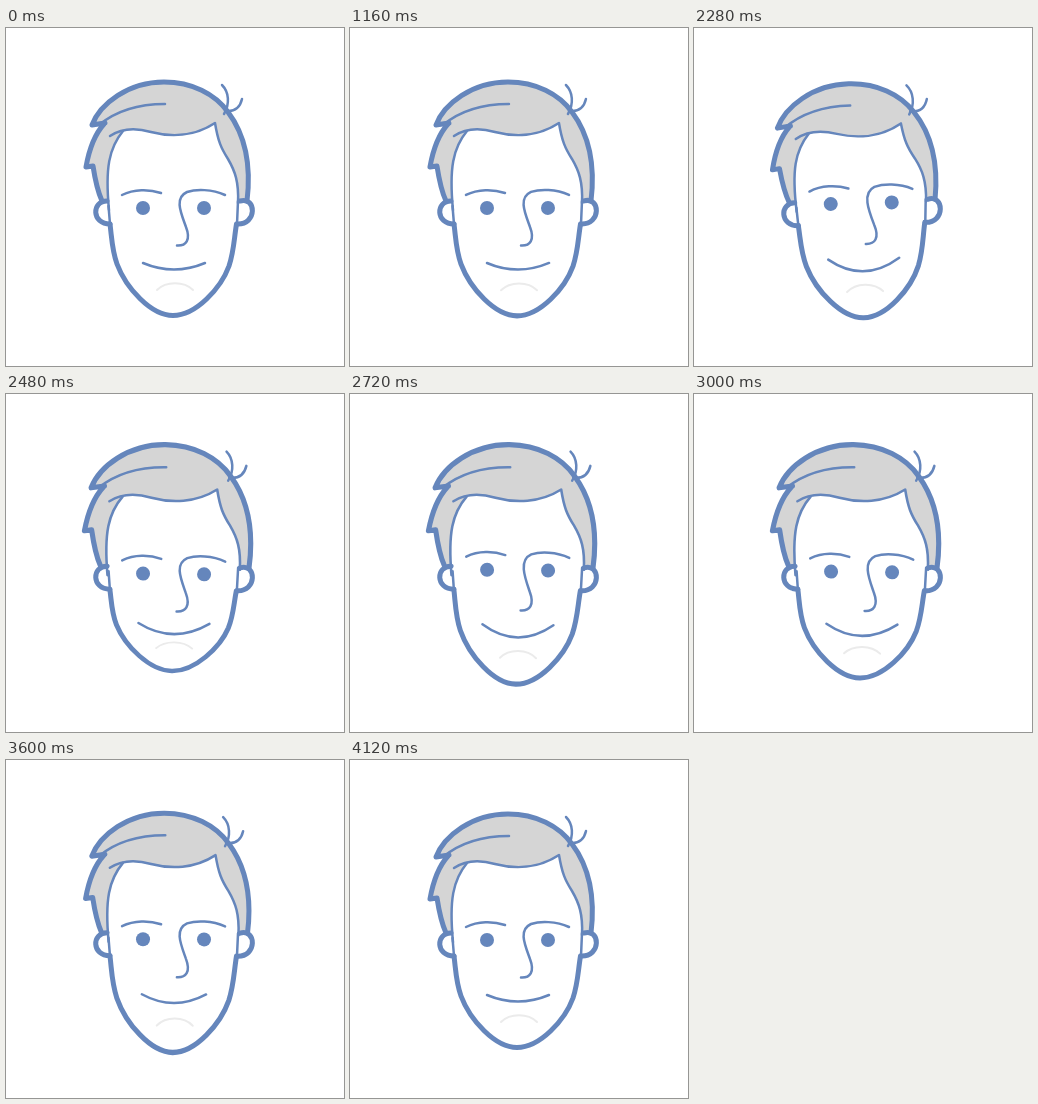
Recreate the animation shown at these times as an HTML page. Size 338 by 338 pixels, loop 5320 ms.

```html
<!DOCTYPE html>
<html lang="en">
<head>
<meta charset="utf-8">
<title>Laughing face</title>
<style>
  html, body { margin: 0; width: 100%; height: 100%; overflow: hidden; background: #fff; }
  svg { display: block; width: 100%; height: 100%; }
  path { fill: none; stroke: #6586bc; stroke-width: 2.5; stroke-linecap: round; stroke-linejoin: round; }
  .thick { stroke-width: 5; }
  .hair { fill: #d5d5d5; stroke: none; }
  .skin { fill: #fff; stroke: none; }
  .crease { stroke: #ebebeb; stroke-width: 2; }
  circle { fill: #6586bc; }
</style>
</head>
<body>
<svg viewBox="0 0 338 338">
  <g id="head">
    <g id="hair">
      <path class="hair" d="M86 97C94 76 122 54 158 54C186 54 209 66 222 84C237 104 246 132 241 174L96 173C91 162 89 151 87 138L80 139C83 122 88 107 98 96Z"/>
      <path class="thick" d="M99 95L86 97C94 76 122 54 158 54C186 54 209 66 222 84C237 104 246 132 241 173"/>
      <path class="thick" d="M98 96C88 107 83 122 80 139L87 138C89 151 91 162 96 173"/>
      <path d="M93 97C111 82 133 76 159 76"/>
    </g>
    <g id="hairline">
      <path class="skin" d="M117 103C126 101 134 101 145 104C164 109 188 109 209 95C212 113 215 120 222 131C229 143 233 154 232 178L103 178C99 140 103 120 117 103Z"/>
      <path d="M104 108C116 100 131 100 145 104C164 109 188 109 209 95C212 113 215 120 222 131C229 143 233 154 232 175"/>
      <path d="M117 103C103 120 99 140 103 182"/>
    </g>
    <g id="tuft">
      <path d="M216 57C223 64 224 76 218 86"/>
      <path d="M236 71C234 80 228 84 219 83"/>
    </g>
    <path class="thick" d="M101 173C85.500 173 85.500 196 104 196"/>
    <path class="thick" d="M234 173C250.500 168 251.500 197 231 196"/>
    <path d="M232 173L231 196M102.500 178L104 196"/>
    <g id="jaw">
      <path class="thick" d="M104 196C106 212 106 222 111 236C120 260 145 287.500 167 287.500C190 287.500 215 260 223 238C228 223 228 211 230.500 196"/>
      <path class="crease" d="M151 262C160 253 178 253 187 262"/>
    </g>
    <g id="eyes">
      <path d="M116 167C128 161 143 161 155 165"/>
      <circle cx="137" cy="180" r="7"/>
      <circle cx="198" cy="180" r="7"/>
    </g>
    <path id="nose"/>
    <path id="mouth"/>
  </g>
</svg>
<script>
const LOOP = 5320, STEP = 40;
const CHUCKLE = 416;   // one nod of the jaw, ms

const set = (id, name, value) => document.getElementById(id).setAttribute(name, value);
const move = (id, x, y) => set(id, 'transform', `translate(${x} ${y})`);
const scale = (id, x, y, kx, ky) =>
  set(id, 'transform', `translate(${x * (1 - kx)} ${y * (1 - ky)}) scale(${kx} ${ky})`);

const span = (a, b, t) => Math.min(1, Math.max(0, (t - a) / (b - a)));
const ease = (a, b, t) => (1 - Math.cos(Math.PI * span(a, b, t))) / 2;
const bump = (a, b, t) => Math.sin(Math.PI * span(a, b, t)) ** 2;

function draw(t) {
  const calm = ease(3360, 3720, t);
  const smile = ease(1120, 1680, t) - calm;
  const laugh = ease(2200, 2480, t) - calm;
  const lean = smile - laugh;
  const nod = Math.cos(2 * Math.PI * (t - 2480) / CHUCKLE);   // 1 = jaw up
  const stretch = 7 * (bump(1120, 1680, t) + bump(3360, 3720, t));

  const drop = 2 * lean - laugh * (3.5 + 7 * nod) + stretch;
  const eye = -5 * lean + 2 * laugh * (nod - 1);
  const puff = 1 + 0.025 * laugh;

  set('head', 'transform', `rotate(${0.7 * laugh - 2 * lean} 168 184)`);
  scale('hair', 165, 184, puff, puff - 0.02 * lean);
  scale('hairline', 165, 184, puff, 1 - 0.02 * lean);
  scale('jaw', 0, 196, 1, 1 + drop / 91.5);
  move('tuft', 3 * laugh - lean, 2 * lean);
  move('eyes', 0, eye);

  const brow = y => y + eye, tip = y => y + eye * 0.3;
  set('nose', 'd', `M219 ${brow(167)}C206 ${brow(161)} 190 ${brow(161)} 181 ${brow(164)}` +
    `C168 ${brow(170)} 175 ${tip(185)} 180 ${tip(199)}C185 ${tip(212)} 180 ${tip(218)} 171 ${tip(217.5)}`);

  const corner = 235 - 4.5 * smile + drop * 0.1;
  const low = 248 + 7 * smile + drop * 0.4;
  set('mouth', 'd', `M${137 - 4 * smile} ${corner}Q168 ${low} ${199 + 5 * smile} ${corner}`);
}

const start = performance.now();
function tick() {
  const t = (performance.now() - start) % LOOP;
  draw(Math.floor(t / STEP) * STEP);
  requestAnimationFrame(tick);
}
tick();
</script>
</body>
</html>
```
